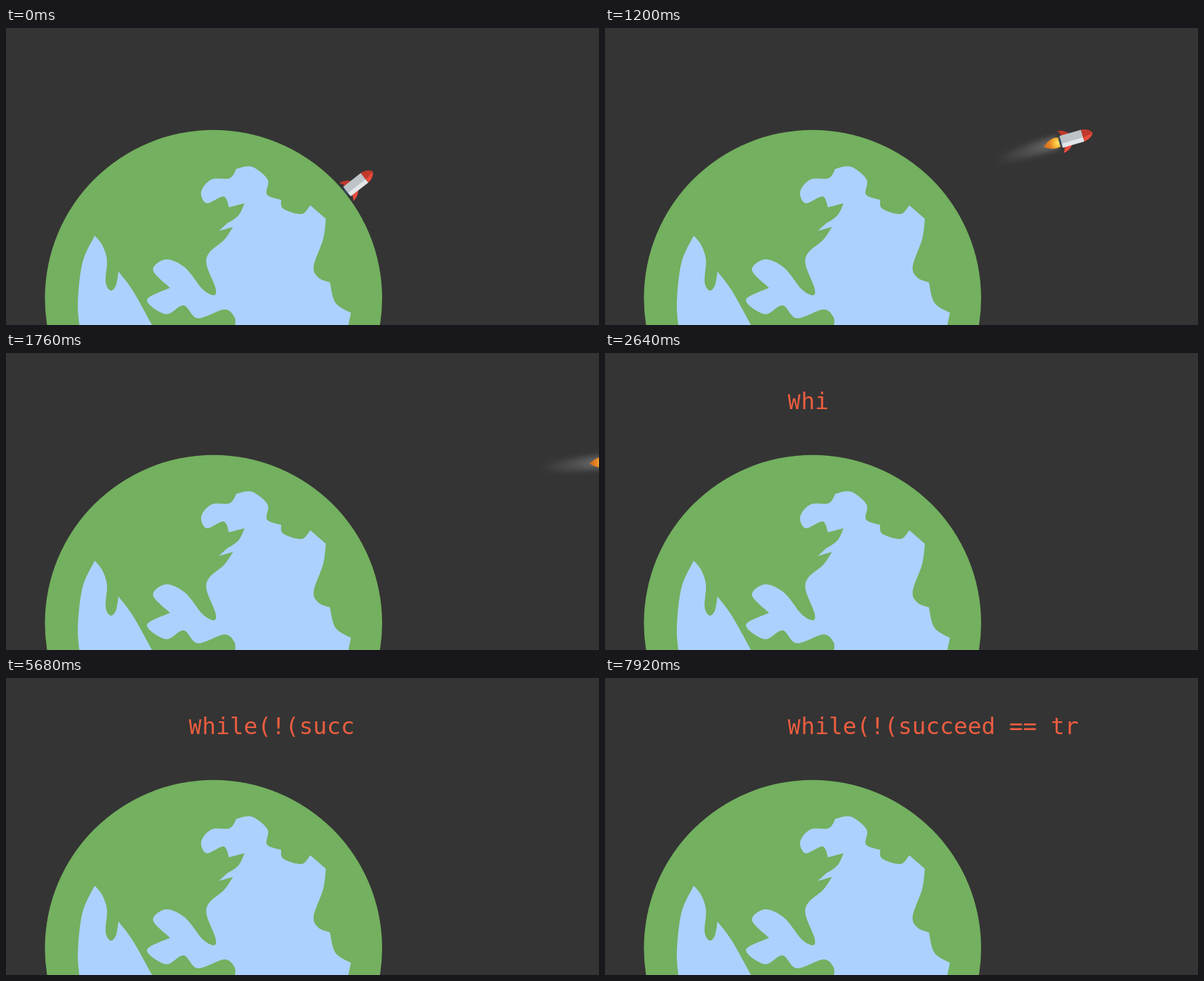
Recreate the animation shown at these times as an HTML page. Size 875 by 439 pixels, loop 8000 ms.

```html
<!DOCTYPE html>
<html lang="en">
<head>
<meta charset="utf-8">
<title>Rocket launch</title>
<style>
  html, body { margin: 0; width: 100%; height: 100%; overflow: hidden; background: #343434; }
  svg { display: block; width: 100%; height: 100%; }
  text { font: 34px "DejaVu Sans Mono", "Noto Sans Mono", monospace; fill: #ea5d40; white-space: pre; }
  #initial { font-size: 31px; text-anchor: middle; }
</style>
</head>
<body>
<svg viewBox="0 0 875 439">
  <defs>
    <radialGradient id="fire" gradientUnits="userSpaceOnUse" cx="-29" cy="0" r="19">
      <stop offset="0" stop-color="#ffe566"/>
      <stop offset=".3" stop-color="#f8bd3c"/>
      <stop offset=".65" stop-color="#e58425"/>
      <stop offset="1" stop-color="#d8701f"/>
    </radialGradient>
    <linearGradient id="smoke" gradientUnits="userSpaceOnUse" x1="-28" x2="-125" y1="0" y2="0">
      <stop offset="0" stop-color="#fff" stop-opacity=".3"/>
      <stop offset=".4" stop-color="#fff" stop-opacity=".16"/>
      <stop offset="1" stop-color="#fff" stop-opacity="0"/>
    </linearGradient>
    <filter id="soft" x="-30%" y="-100%" width="160%" height="300%">
      <feGaussianBlur stdDeviation="4"/>
    </filter>
    <path id="fin" d="M-9-8Q-15-16-25-17Q-22-12-20-7Z"/>
    <path id="cone" d="M9-9Q20-8 24.5 0L9 3Z"/>
  </defs>

  <g class="craft">
    <path class="thrust" fill="url(#smoke)" filter="url(#soft)" d="M-28-9Q-60-12-125-5V6Q-70 10-28 8Z"/>
  </g>

  <circle cx="306.2" cy="399.5" r="248.8" fill="#73b05f"/>
  <g id="water" fill="#add1ff"></g>

  <g class="craft">
    <path class="thrust" fill="url(#fire)" d="M-25-6C-32-11-41-8-51 0C-42 7-33 9-25 6Z"/>
    <rect x="-27" y="-6" width="4" height="12" fill="#34495e"/>
    <use href="#fin" fill="#c0392b"/>
    <use href="#fin" fill="#e74c3c" transform="scale(1 -1)"/>
    <rect x="-24" y="-9" width="33" height="12" fill="#bdc3c7"/>
    <rect x="-24" y="2.5" width="33" height="6.5" fill="#e3e6e8"/>
    <use href="#cone" fill="#e74c3c" transform="scale(1 -1)"/>
    <use href="#cone" fill="#c0392b"/>
  </g>

  <text id="initial" x="279" y="82.5"></text>
  <text id="code" x="289.3" y="82.5"></text>
</svg>
<script>
const LOOP = 8000, STEP = 80, LAUNCH = 400, TYPING = 2000;
const $ = id => document.getElementById(id);

// Key points of the two coastlines; a slash marks a sharp corner.
const coasts = [
  "109,445 106,405 113,346 131,307 / 142,321 149,343 147,375 154,388 162,381 166,360 / 187,388 216,440",
  `338,440 337,427 322,416 283,429 262,410 236,423 208,402 242,384 /
   217,358 236,342 264,354 290,386 307,395 309,384 296,350 300,332 322,313 335,294 /
   314,300 / 326,289 / 343,277 352,259 / 329,265 /
   321,249 296,259 288,242 303,224 330,222 340,208 / 363,205 386,224 385,246 406,254 /
   409,267 436,275 449,262 / 472,282 / 468,312 454,352 461,369 478,376 / 486,406 509,421 / 505,440`
];

// Catmull-Rom curve through each run, written as cubic Béziers.
function coastPath(text) {
  let last, d = "";
  for (const part of text.split("/")) {
    const run = part.trim().split(/\s+/).map(p => p.split(",").map(Number));
    if (last) run.unshift(last);
    else d = "M" + run[0];
    for (let i = 0; i < run.length - 1; i++) {
      const a = run[i], b = run[i + 1];
      const before = run[i - 1] || a, after = run[i + 2] || b;
      const c1 = a.map((v, k) => v + (b[k] - before[k]) / 6);
      const c2 = b.map((v, k) => v - (after[k] - a[k]) / 6);
      d += `C${c1} ${c2} ${b}`;
    }
    last = run[run.length - 1];
  }
  return d + "Z";
}
$("water").innerHTML = coasts.map(c => `<path d="${coastPath(c)}"/>`).join("");

// The rocket gathers speed, levels out and turns towards the horizontal.
function pose(t) {
  const flown = Math.max(t - LAUNCH, 0) / 1000;
  const dx = Math.hypot(285, 450 * flown) - 285;
  return {
    x: 522 + dx,
    y: 159 + 68 * Math.exp(-dx / 53),
    angle: -38 / (1 + (dx / 150) ** 2)
  };
}

// A space is typed together with the character after it.
const keys = "While(!(succeed == tr".match(/ ?\S/g);
// Even rhythm with a brief hesitation after each of the first two groups of four.
const keyTime = n => TYPING + 4 * STEP * n + STEP * Math.min(n >> 2, 2);

const crafts = document.querySelectorAll(".craft");
const [smoke, flame] = document.querySelectorAll(".thrust");

function grow(el, t, duration) {
  const amount = Math.min((t - LAUNCH + STEP) / duration, 1);
  el.style.display = t < LAUNCH ? "none" : "";
  el.setAttribute("transform", `translate(-25 0) scale(${amount} 1) translate(25 0)`);
}

function draw(t) {
  const { x, y, angle } = pose(t);
  for (const craft of crafts) {
    craft.setAttribute("transform", `translate(${x} ${y}) rotate(${angle})`);
    craft.style.display = t < TYPING ? "" : "none";
  }
  grow(flame, t, 240);
  grow(smoke, t, 480);

  const typed = keys.filter((_, n) => t >= keyTime(n)).join("");
  $("initial").textContent = typed.slice(0, 1);
  $("code").textContent = typed.slice(1);
}

const start = performance.now();
function tick() {
  const t = (performance.now() - start) % LOOP;
  draw(Math.floor(t / STEP) * STEP);
  requestAnimationFrame(tick);
}
tick();
</script>
</body>
</html>
```
